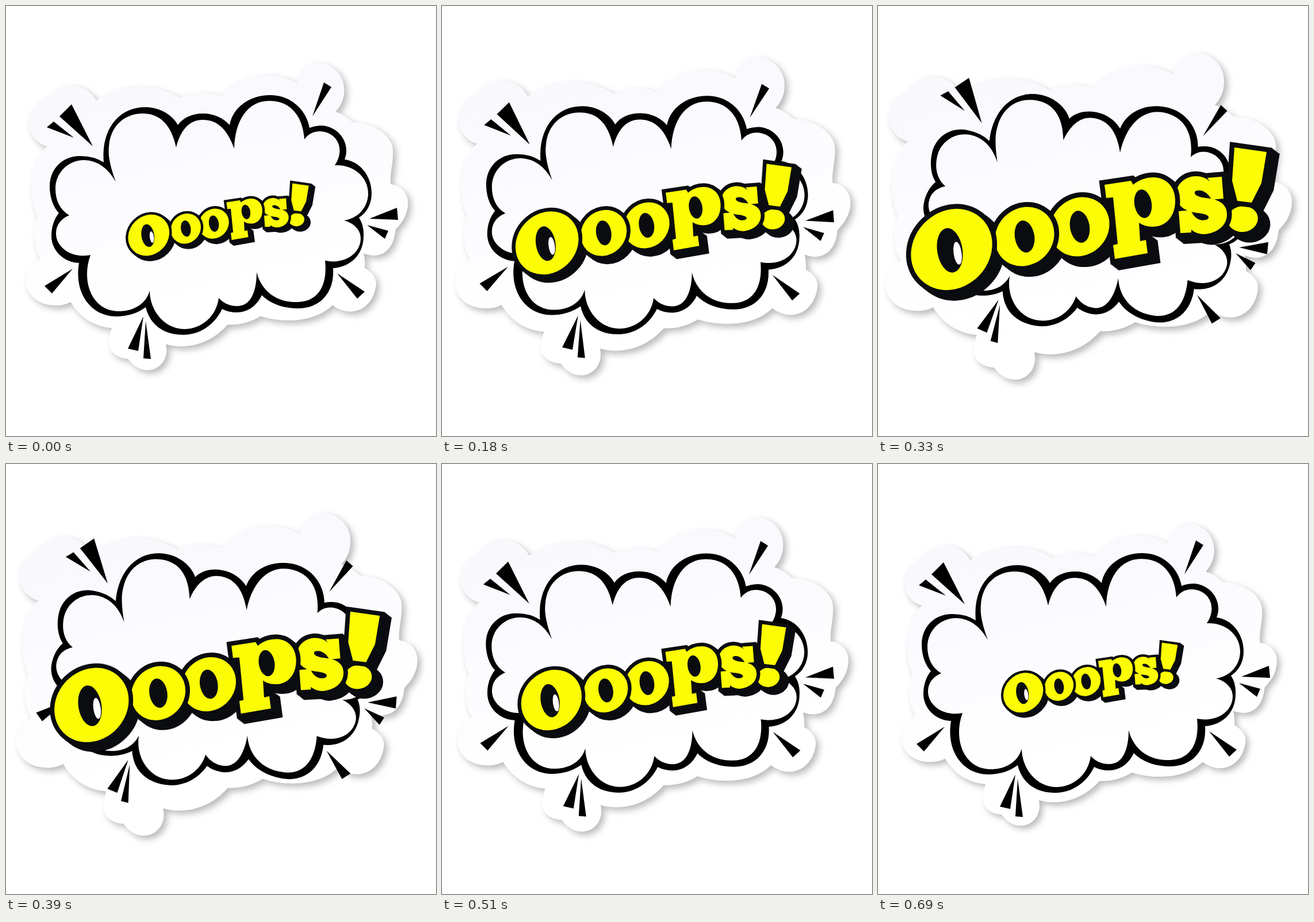
Recreate the animation shown at these times as an HTML page. Size 748 by 748 pixels, loop 720 ms.

```html
<!DOCTYPE html>
<html lang="en">
<head>
<meta charset="utf-8">
<title>Ooops!</title>
<style>
  html, body { margin: 0; width: 100%; height: 100%; overflow: hidden; background: #fff; }
  svg { display: block; width: 100vw; height: 100vh; }
  #sticker { filter: drop-shadow(6px 6px 6px rgba(0, 0, 0, .27)); }
  .letter { fill: #fcfc06; stroke: #0b0c10; stroke-width: 17; paint-order: stroke; stroke-miterlimit: 6; }
  .ink { fill: #0b0c10; }
  #depth .letter { fill: #0b0c10; }
</style>
</head>
<body>
<svg viewBox="0 0 748 748" role="img" aria-label="Ooops!">
  <defs>
    <linearGradient id="paper" gradientUnits="userSpaceOnUse" x1="310" y1="90" x2="410" y2="500">
      <stop offset="0" stop-color="#f8f8fd"/>
      <stop offset=".5" stop-color="#fcfcff"/>
      <stop offset="1" stop-color="#fff"/>
    </linearGradient>
  </defs>

  <g id="sticker">
    <path fill="url(#paper)" d="M52 236A46 46 0 0 1 50 148A54 54 0 0 1 143 151
      A140 140 0 0 1 297 146A94 94 0 0 1 373 143A111 111 0 0 1 514 119
      A40 40 0 0 1 552 81A50 50 0 0 1 602 128A60 60 0 0 1 586 172
      C605 178 612 188 620 192C650 192 688 212 692 240C694 265 686 285 688 306
      A34 34 0 0 1 720 340C720 365 706 380 697 390C694 420 680 437 658 438
      Q648 438 638 434Q641 447 640 461C655 470 662 480 661 492
      C658 520 640 541 614 542Q596 542 580 530C560 550 530 558 500 558
      Q472 558 447 550Q420 567 386 566C365 590 335 606 300 606Q286 606 272 602
      C278 628 262 650 238 650Q217 650 202 629C182 628 166 616 167 600Q167 586 172 572
      C140 570 112 552 96 524Q80 532 62 530C30 528 13 505 13 485C13 468 22 450 40 443
      C28 425 24 395 34 365C18 330 18 265 52 236Z"/>
  </g>

  <g id="cloud">
    <path fill-rule="evenodd" d="M170 272C165 215 196 176 242 176C268 176 290 190 299 207
      C308 194 324 187 343 187C362 187 378 195 389 207C394 178 422 155 460 155
      C495 155 522 180 528 212Q538 208 550 208C580 210 600 240 589 267
      C615 270 636 295 636 326C636 345 627 360 614 368Q623 382 622 400
      C622 432 600 454 569 456C572 500 545 526 508 526C482 526 460 518 445 503
      C436 522 420 533 402 533Q387 533 376 527C362 556 336 572 308 572
      C275 572 251 556 243 524C228 535 210 540 192 540C148 540 118 500 127 447
      C100 446 79 425 79 400C79 384 84 370 92 360C82 350 76 332 76 314
      C76 282 100 260 130 261Q153 261 170 272Z
      M191 306C178 270 178 255 179 245C181 210 205 187 238 187C266 187 287 204 296 246
      C304 214 320 198 342 198C366 198 384 212 397 248C398 200 420 165 458 165
      C494 165 516 190 519 232Q529 218 546 218C576 219 591 249 572 277
      C605 275 630 298 630 326C630 350 612 370 588 373C606 378 617 390 617 404
      C617 430 590 450 555 443C560 490 540 515 506 515C470 516 444 495 436 463
      C436 500 424 522 402 522Q383 522 370 508C366 540 340 562 310 562
      C276 562 250 530 250 495C244 518 222 531 196 531C150 531 130 480 147 433
      C115 440 87 420 87 396Q87 374 110 364C94 355 86 338 86 318
      C86 290 108 268 136 268Q170 269 191 306Z"/>
    <path d="M71 211L83 201L118 229ZM93 192L114 171L151 244ZM553 133L566 141L533 192Z
      M680 351L682 372L632 370ZM628 381L665 391L659 405ZM576 465L624 497L611 509Z
      M116 457L67 487L80 500ZM239 540L212 596L230 600ZM243 548L239 613L252 614Z"/>
  </g>

  <g id="word">
    <g id="depth"></g>
    <g id="face"></g>
  </g>
</svg>

<script>
const LOOP = 720, STEP = 30, PEAK = 330, LAST = 690;
const SHIFT = [13, 10];
const $ = id => document.getElementById(id);

function add(parent, name, attrs) {
  const node = document.createElementNS('http://www.w3.org/2000/svg', name);
  for (const key in attrs) node.setAttribute(key, attrs[key]);
  parent.append(node);
  return node;
}

const oval = (cx, cy, rx, ry, tilt = 0) =>
  ['ellipse', { cx, cy, rx, ry, transform: `rotate(${tilt} ${cx} ${cy})` }];
const path = d => ['path', { d }];

const letters = [
  { shape: oval(128, 423.5, 75, 66, -45), hole: oval(125, 425, 22, 39, -9) },
  { shape: oval(255, 401, 54, 49, -45), hole: oval(255, 401, 17, 28, -9) },
  { shape: oval(351, 384, 54, 49, -45), hole: oval(351, 384, 17, 28, -9) },
  {
    shape: path('M394 311L440 304L444 311C454 302 467 298 480 298C503 299 517 316 517 339' +
      'C517 366 501 384 478 384Q464 384 454 377L456 409L466 407L469 430L412 440L409 416L417 414' +
      'L409 333L397 334Z'),
    hole: oval(461, 344, 15, 25, -9)
  },
  {
    shape: path('M577 305L573 299L598 297L601 335L580 337C574 324 562 318 552 322' +
      'C548 328 556 332 570 334C595 336 608 346 607 364C606 384 588 395 568 397Q554 397 545 389' +
      'L545 394L526 395L523 357L544 355C550 370 562 376 573 371C580 366 570 361 555 360' +
      'C532 357 518 346 519 326C520 308 535 297 552 296Q568 296 577 305Z')
  },
  { shape: path('M620 246L676 254L667 308L650 342L625 339L616 304Z') },
  { shape: oval(634.5, 370.5, 26.5, 22.5, -8) }
];

function draw(parent, [name, attrs], cls) {
  add(parent, name, { ...attrs, class: cls });
}

// Solid side of the lettering
for (let i = 1; i <= 6; i++) {
  const [x, y] = SHIFT.map(v => v * i / 6);
  const layer = add($('depth'), 'g', { transform: `translate(${x} ${y})` });
  for (const { shape } of letters) draw(layer, shape, 'letter');
}

// Earlier letters overlap later ones
for (const { shape, hole } of [...letters].reverse()) {
  draw($('face'), shape, 'letter');
  if (hole) draw($('face'), hole, 'ink');
}
add($('face'), 'ellipse', {
  cx: 138.5, cy: 430, rx: 7, ry: 20, fill: '#fdfdff', transform: 'rotate(-8 138.5 430)'
});

const mix = (a, b, k) => a + (b - a) * k;
const ease = k => (1 - Math.cos(Math.PI * k)) / 2;

// Grows linearly from `start` to 1, then shrinks linearly to `end`
const pulse = (t, start, end) =>
  t <= PEAK ? mix(start, 1, t / PEAK) : mix(1, end, (t - PEAK) / (LAST - PEAK));

// Cloud tilt: [time, degrees]
const TILT = [[0, 0], [92, -3.2], [342, 11.2], [592, -3.2], [690, 0]];

function sway(t) {
  const i = Math.max(1, TILT.findIndex(([at]) => at >= t));
  const [t0, a] = TILT[i - 1], [t1, b] = TILT[i];
  return mix(a, b, ease((t - t0) / (t1 - t0)));
}

const scaleAt = (x, y, s) => `translate(${x} ${y}) scale(${s}) translate(${-x} ${-y})`;

function render(now) {
  const t = Math.floor((now % LOOP) / STEP) * STEP;
  $('sticker').setAttribute('transform', scaleAt(374, 373, pulse(t, .94, .9245)));
  $('cloud').setAttribute('transform', `rotate(${sway(t)} 373 375.5)`);
  $('word').setAttribute('transform', scaleAt(372.5, 373, pulse(t, .508, .49)));
}

let begin;
function tick(now) {
  begin ??= now;
  render(now - begin);
  requestAnimationFrame(tick);
}
render(0);
requestAnimationFrame(tick);
</script>
</body>
</html>
```
